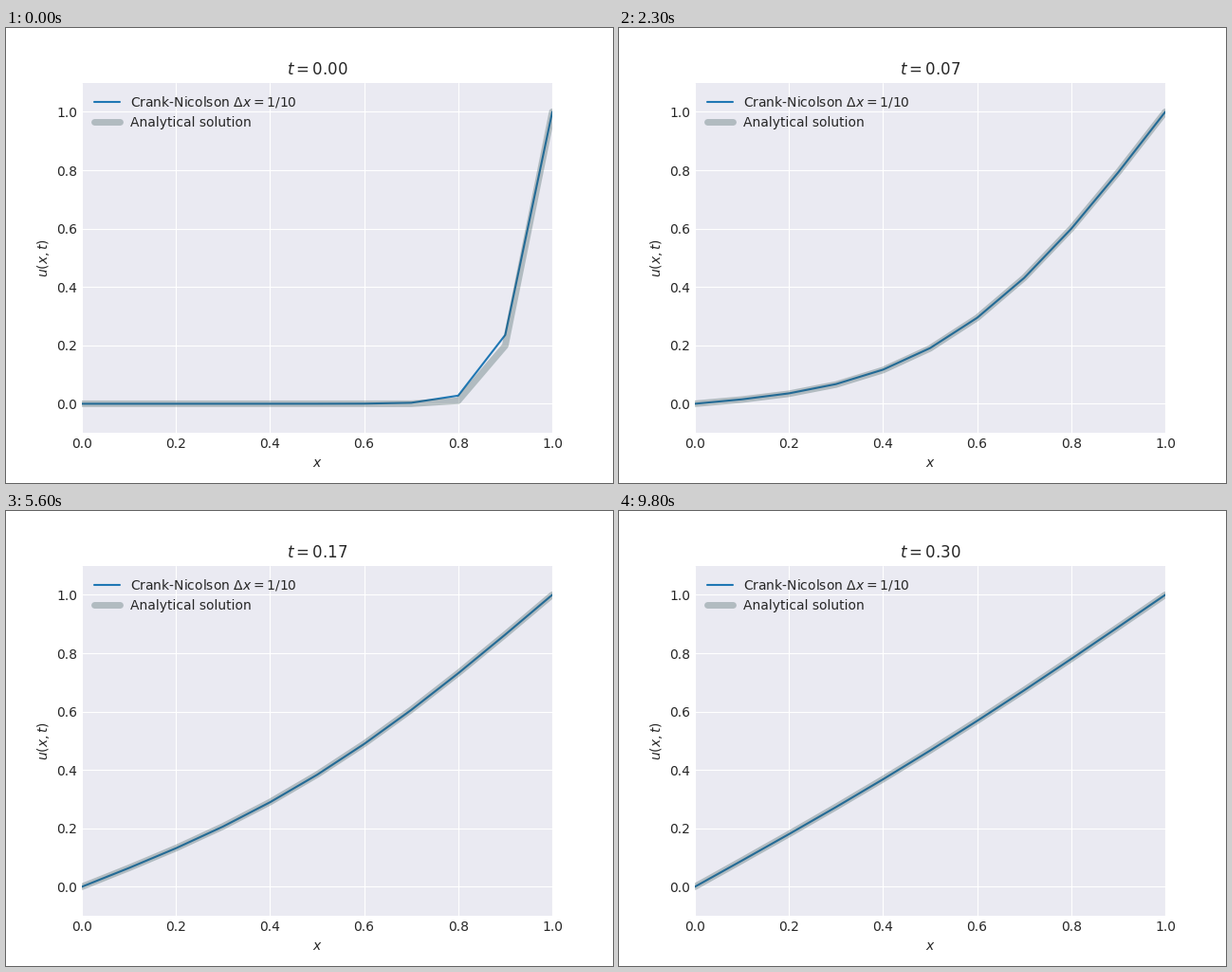
Write a matplotlib script that moves like this. It is 640x480 px and loops after 9.9 s.

```python
import numpy as np
import matplotlib.pyplot as plt
from matplotlib.animation import FuncAnimation

plt.rcParams.update({
    "font.family": "DejaVu Sans",
    "figure.facecolor": "white",
    "text.color": ".15",
    "axes.labelcolor": ".15",
    "axes.facecolor": "#EAEAF2",
    "axes.edgecolor": "white",
    "axes.linewidth": 0,
    "axes.grid": True,
    "axes.axisbelow": True,
    "grid.color": "white",
    "grid.linestyle": "-",
    "grid.linewidth": 0.8,
    "lines.solid_capstyle": "round",
    "xtick.color": ".15",
    "ytick.color": ".15",
    "xtick.major.size": 0,
    "ytick.major.size": 0,
    "legend.frameon": False,
})

CELLS = 10
STEPS = 99
T_END = 0.3

x = np.linspace(0, 1, CELLS + 1)
times = np.linspace(0, T_END, STEPS + 1)
r = times[1] * CELLS**2


def crank_nicolson():
    """Heat equation with u(0) = 0 and u(1) = 1, starting from zero."""
    lap = np.zeros((CELLS + 1, CELLS + 1))
    for j in range(1, CELLS):
        lap[j, j - 1:j + 2] = 1, -2, 1
    eye = np.eye(CELLS + 1)
    step = np.linalg.solve(eye - r / 2 * lap, eye + r / 2 * lap)
    u = np.zeros((STEPS + 1, CELLS + 1))
    u[0, -1] = 1
    for k in range(STEPS):
        u[k + 1] = step @ u[k]
    return u


def analytical(t, terms=200):
    n = np.arange(1, terms + 1)[:, None]
    decay = np.exp(-(n * np.pi)**2 * t)
    series = 2 / (n * np.pi) * (-1.0)**n * decay * np.sin(n * np.pi * x)
    return x + series.sum(axis=0)


numeric = crank_nicolson()

fig, ax = plt.subplots(figsize=(6.4, 4.8), dpi=100)
ax.set(xlim=(0, 1), ylim=(-0.1, 1.1), xlabel="$x$", ylabel="$u(x,t)$")
approx, = ax.plot([], [], color="#1f77b4", lw=1.5,
                  label=r"Crank-Nicolson $\Delta x=1/10$")
exact, = ax.plot([], [], color="darkslategray", lw=5, alpha=0.3,
                 label="Analytical solution")
ax.legend(loc="upper left")
title = ax.set_title("")


def draw(i):
    t = times[i + 1]
    approx.set_data(x, numeric[i + 1])
    exact.set_data(x, analytical(t))
    title.set_text(f"$t={t:.2f}$")
    return approx, exact, title


anim = FuncAnimation(fig, draw, frames=STEPS, interval=100, repeat=True)
plt.show()
```
